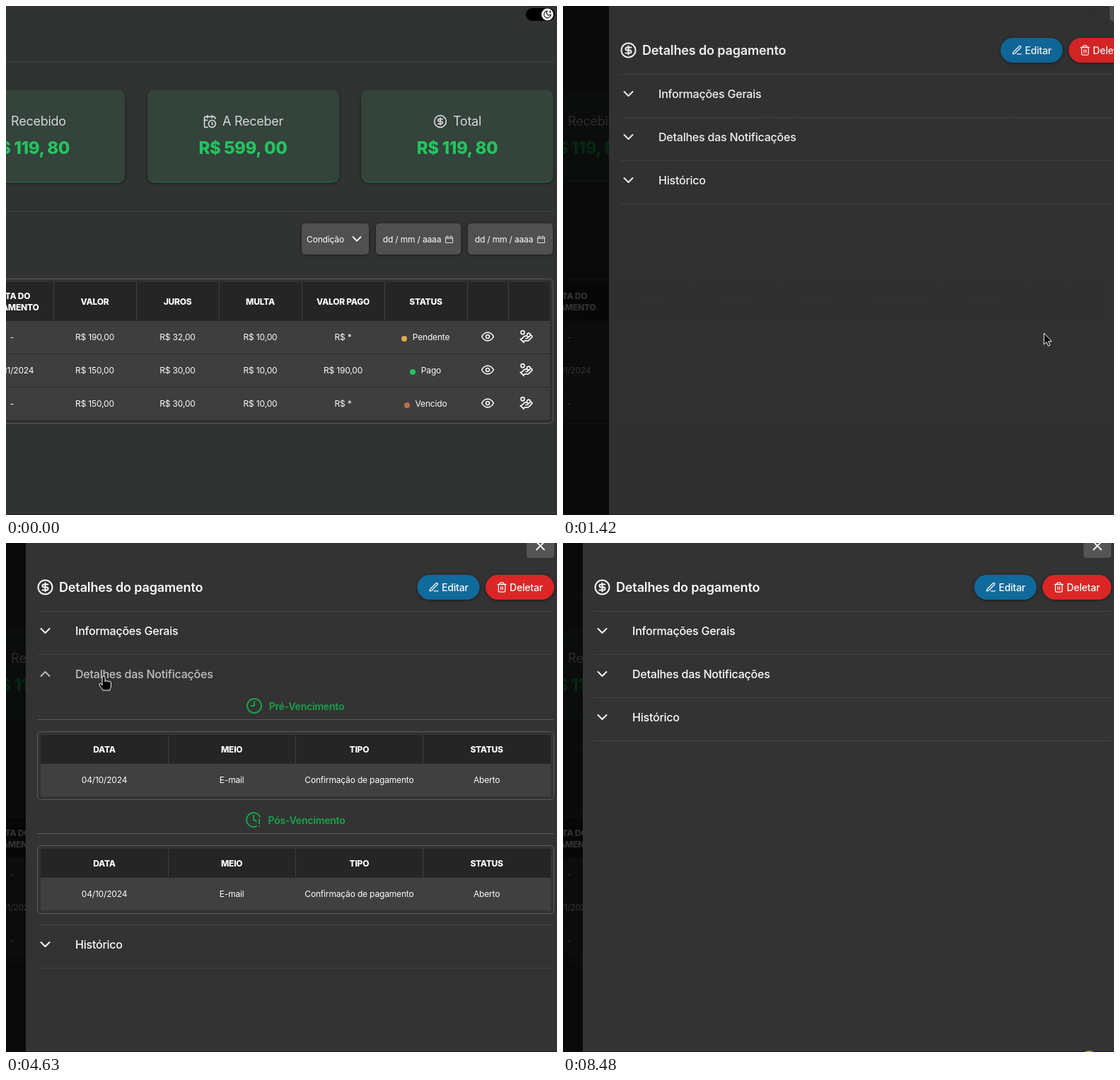
An HTML page for the animation above (8.55 s loop, 779 px wide and 719 px high).

```html
<!DOCTYPE html>
<html lang="pt-BR">
<head>
<meta charset="utf-8">
<title>Detalhes do pagamento</title>
<style>
  html, body { margin: 0; width: 100%; height: 100%; overflow: hidden; background: #313332; }
  #stage { display: block; }
  text { font: 400 12px Inter, sans-serif; letter-spacing: -.014em; fill: #fcfcfc; text-anchor: middle; white-space: pre; }
  .left { text-anchor: start; }
  .end { text-anchor: end; }
  .th { font-weight: 800; letter-spacing: -.25px; }
  .card { font-size: 18px; fill: #d6d6d6; }
  .sum { font-size: 24px; font-weight: 800; letter-spacing: -.017em; fill: #22c55e; }
  .title { font-size: 18px; font-weight: 600; letter-spacing: -.008em; }
  .head { font-size: 16px; font-weight: 450; }
  .mid { font-size: 14px; }
  .soft { fill: #dcdcdc; }
  .label { font-size: 14px; font-weight: 500; fill: #22c55e; }
  .sub { font-size: 14px; font-weight: 600; fill: #18a34a; }
  .btn { font-size: 14px; font-weight: 500; }
  .icon { fill: none; stroke: #f8f8f8; stroke-width: 2; stroke-linecap: round; stroke-linejoin: round; }
  .shadow { filter: drop-shadow(0 1px 2px #0007); }
</style>
</head>
<body>
<svg id="stage" width="779" height="719" viewBox="0 0 779 719"></svg>
<script>
const LOOP = 8550, DRAWER_W = 763;
const $ = id => document.getElementById(id);

// ---- drawing helpers ----
const text = (s, x, y, cls = '') => `<text x="${x}" y="${y}" dy=".36em" class="${cls}">${s}</text>`;
const rect = (x, y, w, h, fill, r = 0, extra = '') =>
  `<rect x="${x}" y="${y}" width="${w}" height="${h}" rx="${r}" fill="${fill}" ${extra}/>`;
const line = (d, color, extra = '') => `<path d="${d}" fill="none" stroke="${color}" ${extra}/>`;
const dot = (x, y, r, fill) => `<circle cx="${x}" cy="${y}" r="${r}" fill="${fill}"/>`;
const ring = (x, y, r) => `M${x - r} ${y}a${r} ${r} 0 1 0 ${2 * r} 0a${r} ${r} 0 1 0 ${-2 * r} 0`;

const icons = {
  dollar: ring(12, 12, 10) + 'M16 8h-6a2 2 0 1 0 0 4h4a2 2 0 1 1 0 4H8M12 18V6',
  calendar: 'M21 7.5V6a2 2 0 0 0-2-2H5a2 2 0 0 0-2 2v14a2 2 0 0 0 2 2h3.5M16 2v4M8 2v4M3 10h5M17.5 17.5 16 16.3V14' + ring(16, 16, 6),
  eye: 'M2 12s3.5-7 10-7 10 7 10 7-3.5 7-10 7-10-7-10-7Z' + ring(12, 12, 3),
  coins: 'M11 15h2a2 2 0 1 0 0-4h-3c-.6 0-1.1.2-1.4.6L3 17M7 21l1.6-1.4c.3-.4.8-.6 1.4-.6h4c1.1 0 2.1-.4 2.8-1.2l4.6-4.4a2 2 0 0 0-2.75-2.91l-4.2 3.9M2 16l6 6' + ring(16, 9, 2.9) + ring(6, 5, 3),
  pencil: 'M12 20h9M16.5 3.5a2.1 2.1 0 0 1 3 3L7 19l-4 1 1-4Z',
  trash: 'M3 6h18M19 6v14c0 1-1 2-2 2H7c-1 0-2-1-2-2V6M8 6V4c0-1 1-2 2-2h4c1 0 2 1 2 2v2M10 11v6M14 11v6',
  clock: ring(12, 12, 10) + 'M12 6v6H7.5',
  alert: 'M12 6v6l4 2M16 21.2a10 10 0 1 1 5-13.5M20 11.5v6M20 21.5h.01',
  chevron: 'M6 9l6 6 6-6',
  moon: 'M12 3a6 6 0 0 0 9 9 9 9 0 1 1-9-9ZM19 3v4M21 5h-4'
};
const icon = (name, x, y, size, extra = '') =>
  `<path class="icon" d="${icons[name]}" transform="translate(${x - size / 2} ${y - size / 2}) scale(${size / 24})" ${extra}/>`;

// ---- page behind the drawer ----
function page() {
  const card = x => rect(x, 118, 271, 132, '#2b5139', 10, 'class="shadow"') + rect(x, 118, 271, 129, '#34433b', 10);
  const dateBox = x => rect(x, 307, 120, 44, '#505050', 5, 'class="shadow"')
    + text('dd / mm / aaaa', x + 51, 330)
    + line(`M${x + 98.5} 326.5h10v8h-10zm0 2h10M${x + 101} 324v2m5-2v2`, '#ddd');
  const centers = [8.5, 125.5, 242.5, 359.5, 476.5];
  const rows = [
    ['-', 'R$ 190,00', 'R$ 32,00', 'R$ 10,00', 'R$ *'],
    ['04/11/2024', 'R$ 150,00', 'R$ 30,00', 'R$ 10,00', 'R$ 190,00'],
    ['-', 'R$ 150,00', 'R$ 30,00', 'R$ 10,00', 'R$ *']
  ];
  const status = [['Pendente', 563, '#dfa84a'], ['Pago', 575, '#22c55e'], ['Vencido', 567, '#bd6f49']];

  return rect(0, 0, 779, 719, '#313332')
    + rect(735, 3, 41, 18, '#000', 9) + dot(765.5, 12, 8.5, '#f4f4f4')
    + icon('moon', 765.5, 12, 13, 'style="stroke:#222"')
    + line('M0 78.5H774M0 290.5H774', '#424443')
    + card(-103) + card(200) + card(502.5)
    + text('Recebido', 46, 163, 'card') + text('R$ 119, 80', 90, 200.5, 'sum end')
    + icon('calendar', 288, 163, 20, 'style="stroke:#d6d6d6"')
    + text('A Receber', 349, 163, 'card') + text('R$ 599, 00', 335, 200.5, 'sum')
    + icon('dollar', 614, 163, 20, 'style="stroke:#d6d6d6"')
    + text('Total', 652, 163, 'card') + text('R$ 119, 80', 638, 200.5, 'sum')
    + rect(418, 307, 95, 44, '#505050', 5, 'class="shadow"') + text('Condição', 451.5, 330) + icon('chevron', 496, 329, 22)
    + dateBox(523) + dateBox(653)
    + rect(-50, 385.5, 823.5, 204, 'none', 6, 'stroke="#595959"')
    + rect(-50, 390, 819, 196, '#282828') + rect(-50, 390, 819, 54, '#252525')
    + line('M67.5 390v54m117-54v54m117-54v54m117-54v54m117-54v54m117-54v54m58-54v54', '#404040')
    + text('DATA DO', 8.5, 410, 'th') + text('PAGAMENTO', 8.5, 425.5, 'th')
    + ['VALOR', 'JUROS', 'MULTA', 'VALOR PAGO', 'STATUS'].map((s, i) => text(s, 125.5 + 117 * i, 418, 'th')).join('')
    + rows.map((row, i) => {
        const y = 468 + 47 * i, [name, x, color] = status[i];
        return rect(-50, y - 23, 819, 46, '#3e3e3e')
          + row.map((s, j) => text(s, centers[j], y)).join('')
          + dot(x, y + 2, 4, color) + text(name, 601, y)
          + icon('eye', 681, y - 1, 20, i ? '' : 'id="eye"') + icon('coins', 735.5, y - 1, 20);
      }).join('');
}

// ---- accordion panels, y measured from the panel's top ----
function infoPanel() {
  const field = (x, row, w, label, value) => {
    const y = Math.round(96.5 * row), c = x + w / 2;
    return text(label, c, y + 10.5, 'label') + line(`M${x} ${y + 27.5}h${w}`, '#5a5a5a')
      + rect(x, y + 36, w, 45, '#16843e') + rect(x, y + 36, w, 43, '#404040')
      + text(value, c, y + 58, 'mid soft');
  };
  return field(44, 0, 233, 'Data pagamento', '04/10/2024')
    + field(293, 0, 232, 'Valor pago', 'R$ 870,00')
    + field(542, 0, 233, 'Valor líquido', 'R$ 870,00')
    + field(44, 1, 233, 'Taxas', 'R$ 0,00')
    + field(293, 1, 232, 'Formas de pagamento', '')
    + text('ZIU', 354, 154.5, 'mid') + dot(383, 154, 9, '#f8f8f8') + text('Boleto', 428, 154.5, 'mid')
    + field(44, 2, 731, 'Observações', 'Observações adicionais inseridas aqui sobre o pagamento...');
}

function grid(y, count) {
  const cells = (list, cy, cls) => list.map((s, i) => text(s, 139 + 180.2 * i, cy, cls)).join('');
  let out = rect(44.5, y - .5, 730, 48 * (count + 1), 'none', 5, 'stroke="#5c5c5c"')
    + rect(49, y + 4, 721, 40, '#252525')
    + line(`M229.5 ${y + 4}v40m180-40v40m180-40v40`, '#404040')
    + cells(['DATA', 'MEIO', 'TIPO', 'STATUS'], y + 25, 'th');
  for (let i = 0; i < count; i++) {
    const top = y + 44 + 47 * i;
    out += rect(49, top, 721, 47, '#404040') + line(`M49 ${top + .5}h721`, '#2a2a2a')
      + cells(['04/10/2024', 'E-mail', 'Confirmação de pagamento', 'Aberto'], top + 24);
  }
  return out;
}

function noticePanel() {
  const section = (y, name, glyph, x) => icon(glyph, x, y + 12, 24, 'style="stroke:#18a34a"')
    + text(name, 425, y + 12.5, 'sub') + line(`M44 ${y + 31.5}h731`, '#5a5a5a') + grid(y + 49, 1);
  return section(0, 'Pré-Vencimento', 'clock', 351) + section(161, 'Pós-Vencimento', 'alert', 350);
}

const items = [
  { name: 'Informações Gerais', body: infoPanel(), size: 305, open: 2340, close: 3800 },
  { name: 'Detalhes das Notificações', body: noticePanel(), size: 321, open: 4270, close: 5570 },
  { name: 'Histórico', body: grid(12, 9), size: 490, open: 6400, close: 7200 }
];

function drawer() {
  return rect(28, 0, DRAWER_W, 719, '#333')
    + rect(736, -18, 39, 39, '#555', 4) + line('M749.5-2l12 12m0-12l-12 12', '#f4f4f4', 'stroke-width="2"')
    + icon('dollar', 55.5, 62.5, 24) + text('Detalhes do pagamento', 75, 63, 'title left')
    + rect(581.5, 45, 88, 35, '#106a9c', 17.5, 'class="shadow"') + icon('pencil', 605, 62.5, 16) + text('Editar', 616, 63, 'btn left')
    + rect(678, 45, 97, 35, '#dc2626', 17.5, 'class="shadow"') + icon('trash', 701, 62.5, 16) + text('Deletar', 712, 63, 'btn left')
    + items.map((item, i) => `<g id="item${i}">${line('M44 .5h731', '#434343')}
        <g id="head${i}"><g id="chev${i}">${icon('chevron', 55.5, 28, 24)}</g>${text(item.name, 98, 28.5, 'head left')}</g>
        <svg id="body${i}" y="61" width="779" height="0">${item.body}</svg></g>`).join('')
    + `<g id="last">${line('M44 .5h731', '#434343')}</g>`;
}

const ARROW = 'M0 0V16L3.7 12.7 6.2 18.2 8.6 17.2 6.2 11.8H11Z';
const HAND = 'M-2 2a2 2 0 0 1 4 0V8c0-2 3-2 3 0 0-1.6 3-1.6 3 .4 0-1.4 2.4-1.2 2.4.6V14c0 3-1.4 4-1.4 6H-1.5c0-2-4-5.5-4.5-8-.3-2 1.8-2 3-.5L-2 13Z';

$('stage').innerHTML = page()
  + rect(0, 0, 779, 719, '#000', 0, 'id="shade"')
  + `<g id="drawer">${drawer()}</g>`
  + rect(0, 718, 779, 1, '#2a0a12', 0, 'opacity=".6"')
  + '<circle id="press" r="12" fill="#d4cc0c" opacity=".72"/>'
  + '<path id="cursor" fill="#000" stroke="#fff" stroke-linejoin="round"/>';

// ---- motion ----
const clamp = v => Math.min(1, Math.max(0, v));
const smooth = v => (v = clamp(v), v * v * (3 - 2 * v));
const easeOut = v => 1 - (1 - clamp(v)) ** 2;

// time, x, y
const path = [
  [110, 720, 724], [720, 675, 466], [920, 680, 462], [1480, 680, 462], [2080, 188, 123],
  [2640, 188, 123], [2810, 183, 151], [3100, 165, 398], [3250, 165, 398], [3580, 150, 123],
  [3900, 150, 123], [4100, 138, 188], [4640, 138, 188], [4970, 148, 187], [5750, 148, 187],
  [6110, 129, 252], [7220, 129, 252], [7360, 230, 178], [7660, 744, 729]
];
const presses = [990, 2200, 3660, 4120, 5420, 6260, 7060, 8480];

function cursorAt(t) {
  const i = path.findIndex(p => p[0] > t);
  if (i < 1) return path[i ? path.length - 1 : 0].slice(1);
  const [a, b] = [path[i - 1], path[i]], k = smooth((t - a[0]) / (b[0] - a[0]));
  return [a[1] + (b[1] - a[1]) * k, a[2] + (b[2] - a[2]) * k];
}

function render(t) {
  const slide = smooth((t - 1098.5) / 372);
  const [x, y] = cursorAt(t);
  const at = `translate(${x} ${y})`;
  let hand = t < 1130 && Math.hypot(x - 681, y - 467) < 12;

  $('shade').setAttribute('opacity', .8 * clamp((t - 1098.5) / 185));
  $('drawer').setAttribute('opacity', slide);
  $('drawer').setAttribute('transform', `translate(${Math.round((1 - slide) * DRAWER_W)})`);
  $('eye').setAttribute('opacity', hand || t > 1130 ? .45 : 1);

  let top = 96;
  items.forEach((item, i) => {
    const k = easeOut((t - item.open) / 200) - easeOut((t - item.close) / 200);
    const hover = t > 1500 && x >= 44 && Math.abs(y - top - 28) < 19;
    hand = hand || hover;
    $('item' + i).setAttribute('transform', `translate(0 ${top})`);
    $('head' + i).setAttribute('opacity', hover ? .7 : 1);
    $('chev' + i).setAttribute('transform', `rotate(${180 * k} 55.5 28)`);
    $('body' + i).setAttribute('height', item.size * k);
    $('body' + i).setAttribute('visibility', k > 0 ? 'visible' : 'hidden');
    top += 61 + item.size * k;
  });
  $('last').setAttribute('transform', `translate(0 ${top})`);

  const pressed = presses.some(p => t >= p && t < p + 140);
  $('press').setAttribute('visibility', pressed ? 'visible' : 'hidden');
  $('press').setAttribute('transform', at);
  $('cursor').setAttribute('d', hand ? HAND : ARROW);
  $('cursor').setAttribute('transform', at);
}

const start = performance.now();
function frame() {
  render((performance.now() - start) % LOOP);
  requestAnimationFrame(frame);
}
frame();
</script>
</body>
</html>
```
